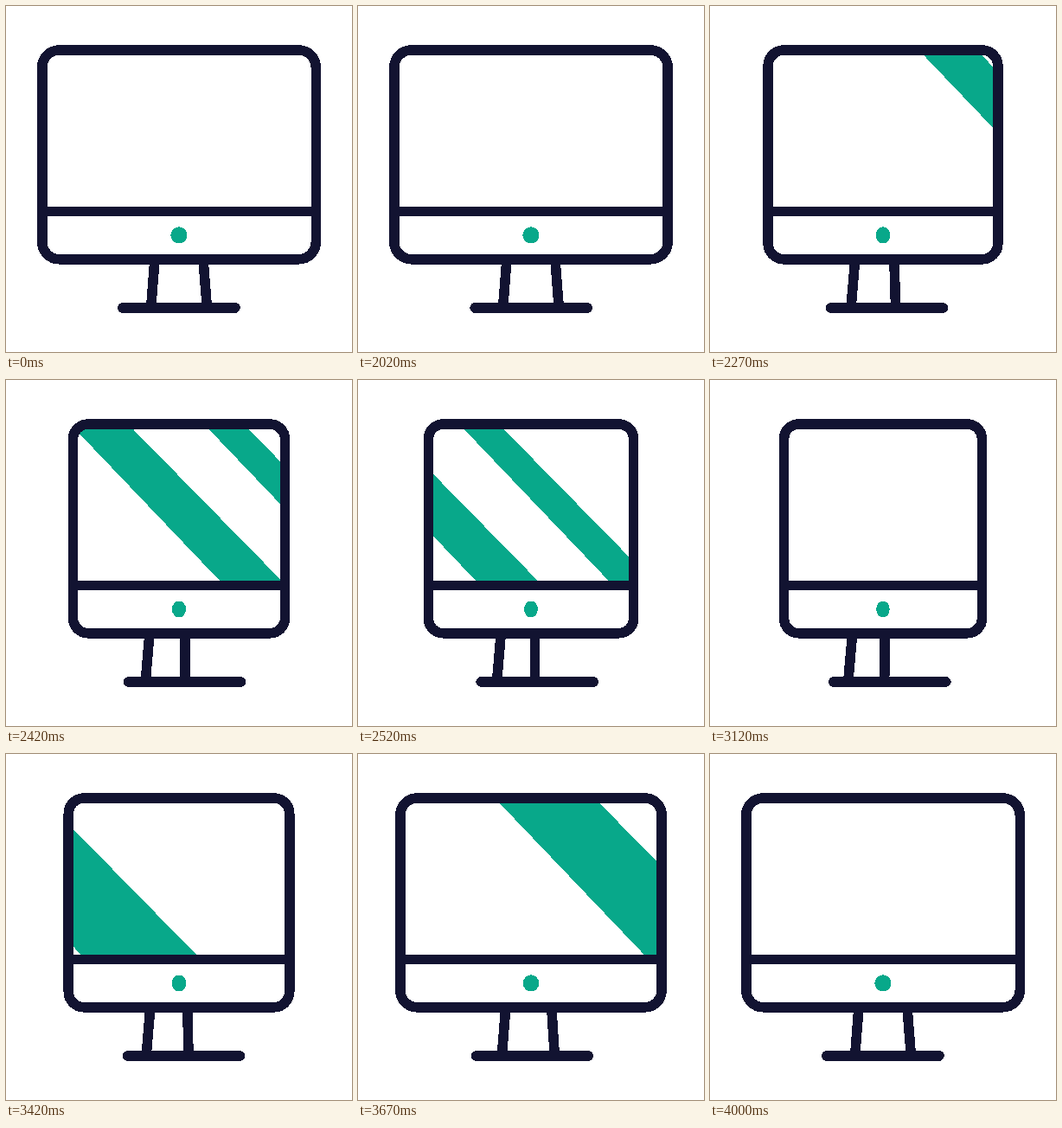
An HTML page for the animation above (4020 ms loop, 400 by 400 pixels).

```html
<!DOCTYPE html>
<html lang="en">
<head>
<meta charset="utf-8">
<title>Monitor</title>
<style>
  html, body { margin: 0; width: 100%; height: 100%; overflow: hidden; background: #fff; }
  svg { display: block; width: 100%; height: 100%; shape-rendering: crispEdges; }
  .line { fill: none; stroke: #121331; stroke-width: 11.6; }
  .accent { fill: #08a88a; }
</style>
</head>
<body>
<svg viewBox="0 0 400 400">
  <defs>
    <clipPath id="screen"><rect id="mask" y="51" height="186.5"/></clipPath>
  </defs>
  <g class="accent" clip-path="url(#screen)">
    <path id="wide"/>
    <path id="thin"/>
    <path id="back"/>
  </g>
  <path id="legs" class="line"/>
  <path id="base" class="line" stroke-linecap="round"/>
  <rect id="frame" class="line" y="51" height="241.8"/>
  <path id="bar" class="line"/>
  <ellipse id="dot" class="accent" cx="200" cy="265" ry="9.6"/>
</svg>
<script>
const LOOP = 4020;
const $ = id => document.getElementById(id);
const set = (id, attrs) => {
  for (const key in attrs) $(id).setAttribute(key, attrs[key]);
};

const lerp = (a, b, k) => a + (b - a) * k;
const span = (t, from, to) => Math.min(1, Math.max(0, (t - from) / (to - from)));
const smooth = u => u * u * (3 - 2 * u);

// Bezier easing with flat ends: handles at (x1, 0) and (x2, 1)
function ease(u, x1, x2) {
  let lo = 0, hi = 1;
  for (let i = 0; i < 24; i++) {
    const s = (lo + hi) / 2, r = 1 - s;
    const x = 3 * r * r * s * x1 + 3 * r * s * s * x2 + s * s * s;
    if (x < u) lo = s; else hi = s;
  }
  return smooth((lo + hi) / 2);
}

// Diagonal band given by its left and right x at the top of the screen
function band(id, left, right) {
  const top = 47, bottom = 242;
  const edge = (x, y, slope) => `${x + (y - 57) / slope} ${y}`;
  set(id, {
    d: `M${edge(left, top, 1.048)}L${edge(right, top, 1.02)}` +
       `L${edge(right, bottom, 1.02)}L${edge(left, bottom, 1.048)}Z`
  });
}

function drawMonitor(turn) {
  const half = lerp(158.3, 113.7, turn);
  const radius = lerp(20, 17, turn);
  const box = { x: 200 - half, width: 2 * half, rx: radius, ry: radius };
  set('frame', box);
  set('mask', box);
  set('bar', { d: `M${200 - half} 237.5H${200 + half}` });
  set('dot', { rx: lerp(9.6, 7.7, turn) });

  const leg = (topX, lowX) => `M${topX} 293L${lowX} 349`;
  set('legs', {
    d: leg(lerp(172, 164.5, turn), lerp(167.6, 159.6, turn)) +
       leg(lerp(228, 201.5, turn), lerp(232.4, 201.2, turn))
  });
  const shift = 8 * turn;
  set('base', { d: `M${135 + shift} 349H${265 + shift}` });
}

function drawBands(t) {
  const sweep = (id, delay, width) => {
    const mid = lerp(443, -170, smooth(span(t, 2000 + delay, 2800 + delay)));
    band(id, mid - width / 2, mid + width / 2);
  };
  sweep('wide', 1, 67);
  sweep('thin', 129, 46);

  const k = smooth(span(t, 3050, 4050));
  band('back', lerp(-287, 378, k), lerp(-147, 482, k));
}

function draw(t) {
  const turn = t < 3000
    ? ease(span(t, 2000, 2900), 0.24, 0.14)
    : 1 - ease(span(t, 3000, 4000), 0.6, 0.4);
  drawMonitor(turn);
  drawBands(t);
}

const start = performance.now();
function tick() {
  draw((performance.now() - start) % LOOP);
  requestAnimationFrame(tick);
}
tick();
</script>
</body>
</html>
```
